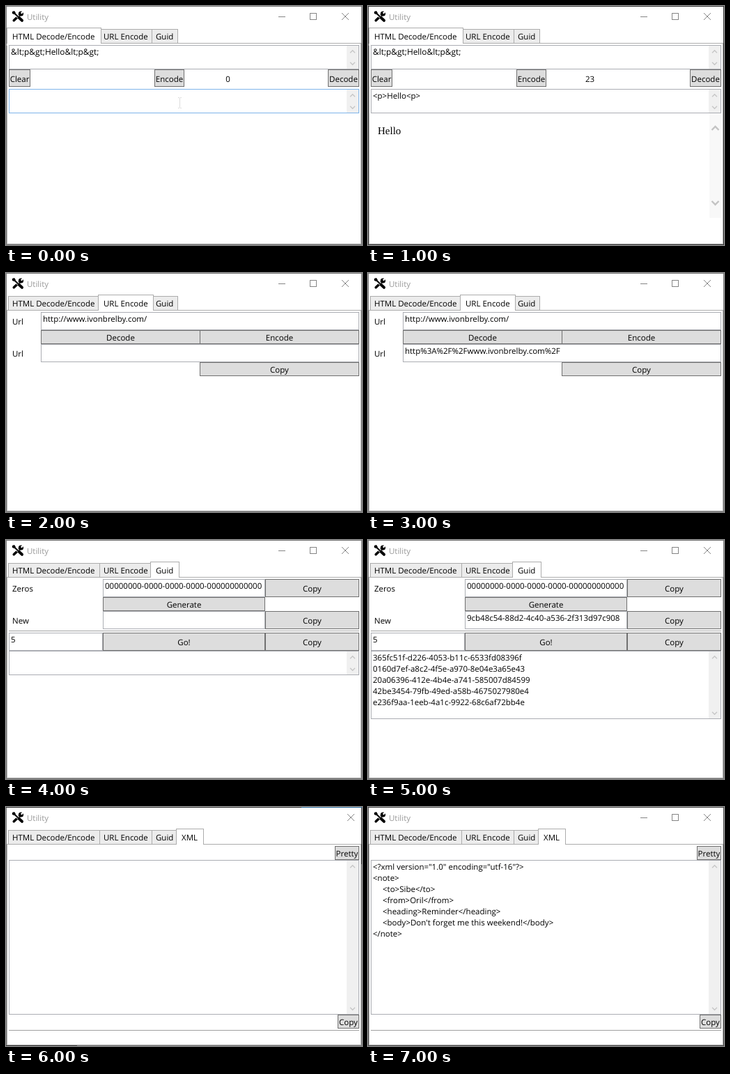
An HTML page for the animation above (8 s loop, 511 by 343 pixels).

```html
<!DOCTYPE html>
<html>
<head>
<meta charset="utf-8">
<style>
  html, body { margin: 0; width: 100%; height: 100%; overflow: hidden; background: #fff; }
  svg { display: block; }
  text { font-family: "Open Sans", "Noto Sans", sans-serif; font-size: 11.5px; text-rendering: geometricPrecision; }
</style>
</head>
<body>
<svg id="stage" width="511" height="343" viewBox="0 0 511 343"></svg>
<script>
const SCENE_MS = 1000;
const escape = s => s.replace(/&/g, '&amp;').replace(/</g, '&lt;').replace(/>/g, '&gt;');

// Pixel-aligned box from the outer edges x0..x1, y0..y1
const box = (x0, y0, x1, y1, fill, stroke) =>
  `<rect x="${x0 + .5}" y="${y0 + .5}" width="${x1 - x0 - 1}" height="${y1 - y0 - 1}" fill="${fill}" stroke="${stroke}"/>`;
const fillBox = (x, y, w, h, fill) => `<rect x="${x}" y="${y}" width="${w}" height="${h}" fill="${fill}"/>`;
const path = (d, stroke, width = 1, extra = '') =>
  `<path d="${d}" fill="none" stroke="${stroke}" stroke-width="${width}" ${extra}/>`;
const text = (x, y, s, extra = '') => `<text x="${x}" y="${y}" ${extra}>${escape(s)}</text>`;
const centered = (x, y, s) => text(x, y, s, 'text-anchor="middle"');

const button = (x0, y0, x1, y1, label) =>
  box(x0, y0, x1, y1, '#ddd', '#707070') + centered((x0 + x1) / 2, (y0 + y1) / 2 + 5, label);
const field = (x0, y0, x1, y1, value = '', stroke = '#abadb3') =>
  box(x0, y0, x1, y1, '#fff', stroke) + text(x0 + 3, y0 + 14, value);
const chevron = (x, y, dir, width = 1.3, size = 3.5, color = '#c6c6c6') =>
  path(`M${x - size} ${y + dir * size / 2}L${x} ${y - dir * size / 2}L${x + size} ${y + dir * size / 2}`, color, width);

// Multi-line text box with a disabled scroll bar
const area = (y0, y1, lines = [], stroke) =>
  field(4, y0, 507, y1, '', stroke) + fillBox(489, y0 + 1, 17, y1 - y0 - 2, '#f0f0f0') +
  chevron(497.5, y0 + 9.5, 1) + chevron(497.5, y1 - 8.5, -1) +
  lines.map((s, i) => text(s[0] === ' ' ? 21 : 7, y0 + 14 + 16 * i, s.trim())).join('');

const tabs = [['HTML Decode/Encode', 3, 135], ['URL Encode', 134, 210], ['Guid', 209, 247], ['XML', 246, 282]];

function tab(index, selected) {
  const [label, x0, x1] = tabs[index];
  const shape = selected
    ? box(x0 - 2, 31, x1 + 2, 56, '#fff', '#acacac') + fillBox(x0 - 2, 54, x1 - x0 + 4, 3, '#fff')
    : box(x0, 33, x1, 54, '#ececec', '#acacac');
  return shape + text(x0 + 6, 48, label);
}

function toolsIcon() {
  const round = 'stroke-linecap="round"';
  return path('M11.3 20.7L20 12.5', '#000', 3.6, round) +
    '<circle cx="21.5" cy="11" r="3.6"/>' + path('M21.8 10.7L26 6.5', '#fff', 2.4) +
    path('M10.5 8.5L18 16', '#fff', 4) + path('M10.5 9L18 16', '#000', 2) +
    '<path d="M9 8l3-1 2 3-2 2-3-1z"/>' + path('M18.7 16.7L23 20.8', '#000', 4, round);
}

function windowFrame(selected, tabCount, edge, dialog) {
  const x = dialog ? 490 : 482, gray = '#858585';
  let out = box(0, 0, 511, 343, '#fff', edge) + toolsIcon() + text(30, 20, 'Utility', 'fill="#999"');
  if (!dialog) out += path('M391 15.5H401', gray) + box(436, 10, 446, 20, 'none', gray);
  out += path(`M${x} 10l10 10m0 -10l-10 10`, gray);
  out += box(1, 53, 510, 342, '#fff', '#acacac');
  for (let i = 0; i < tabCount; i++) if (i !== selected) out += tab(i, false);
  return out + tab(selected, true);
}

const encoded = '&lt;p&gt;Hello&lt;p&gt;';

function htmlScene(decoded) {
  let out = windowFrame(0, 3, decoded ? '#383838' : '#777') + area(56, 91) +
    text(7, 70, encoded, 'style="font-size:11.9px"') +
    button(4, 91, 35, 116, 'Clear') + button(213, 91, 256, 116, 'Encode') + button(462, 91, 507, 116, 'Decode') +
    centered(318.5, 109, decoded ? '23' : '0') +
    area(119, 154, decoded ? ['<p>Hello<p>'] : [], decoded ? undefined : '#7eb4ea');
  if (!decoded) return out + path('M247 131.5h2m1 0h2M249.5 132v14M247 146.5h2m1 0h2', '#ddd');
  return out + fillBox(490, 154, 17, 150, '#f8f8f8') +
    chevron(498.5, 175.5, 1, 2.4, 5, '#c3c3c3') + chevron(498.5, 282.5, -1, 2.4, 5, '#c3c3c3') +
    text(14, 184, 'Hello', 'style="font:15px \'Liberation Serif\',serif"');
}

const urlScene = done => windowFrame(1, 3, '#777') +
  text(9, 74, 'Url') + field(50, 56, 507, 82, 'http://www.ivonbrelby.com/') +
  button(50, 82, 279, 102, 'Decode') + button(278, 82, 507, 102, 'Encode') +
  text(9, 120, 'Url') + field(50, 102, 507, 128, done ? 'http%3A%2F%2Fwww.ivonbrelby.com%2F' : '') +
  button(278, 128, 507, 148, 'Copy');

const guids = [
  '365fc51f-d226-4053-b11c-6533fd08396f',
  '0160d7ef-a8c2-4f5e-a970-8e04e3a65e43',
  '20a06396-412e-4b4e-a741-585007d84599',
  '42be3454-79fb-49ed-a58b-4675027980e4',
  'e236f9aa-1eeb-4a1c-9922-68c6af72bb4e'
];

const guidScene = done => windowFrame(2, 3, '#777') +
  text(9, 74, 'Zeros') + field(139, 56, 372, 82, '00000000-0000-0000-0000-000000000000') +
  button(372, 56, 507, 82, 'Copy') + button(139, 82, 372, 102, 'Generate') +
  text(9, 120, 'New') + field(139, 102, 372, 128, done ? '9cb48c54-88d2-4c40-a536-2f313d97c908' : '') +
  button(372, 102, 507, 128, 'Copy') + path('M4 130.5H507', '#a0a0a0') +
  field(4, 133, 139, 159, '5') + button(139, 133, 372, 159, 'Go!') + button(372, 133, 507, 159, 'Copy') +
  (done ? area(159, 257, guids) : area(159, 194));

const note = [
  '<?xml version="1.0" encoding="utf-16"?>',
  '<note>',
  '  <to>Sibe</to>',
  '  <from>Oril</from>',
  '  <heading>Reminder</heading>',
  "  <body>Don't forget me this weekend!</body>",
  '</note>'
];

function xmlScene(done) {
  const out = windowFrame(3, 4, done ? '#4a4a4a' : '#777', !done) +
    button(472, 56, 507, 76, 'Pretty') + area(76, 298, done ? note : []) +
    button(476, 298, 507, 318, 'Copy') + path('M4 320.5H507', '#a0a0a0');
  return done ? out : out + fillBox(0, 0, 424, 1, '#333') + fillBox(424, 0, 87, 1, '#2f6f9f') +
    fillBox(0, 342, 102, 1, '#333') + fillBox(510, 1, 1, 81, '#333');
}

const stage = document.getElementById('stage');
const scenes = [htmlScene, urlScene, guidScene, xmlScene].flatMap(scene => [scene(false), scene(true)]);
let shown = -1;

function draw() {
  const index = Math.floor(performance.now() / SCENE_MS) % scenes.length;
  if (index !== shown) stage.innerHTML = scenes[shown = index];
  requestAnimationFrame(draw);
}
draw();
</script>
</body>
</html>
```
